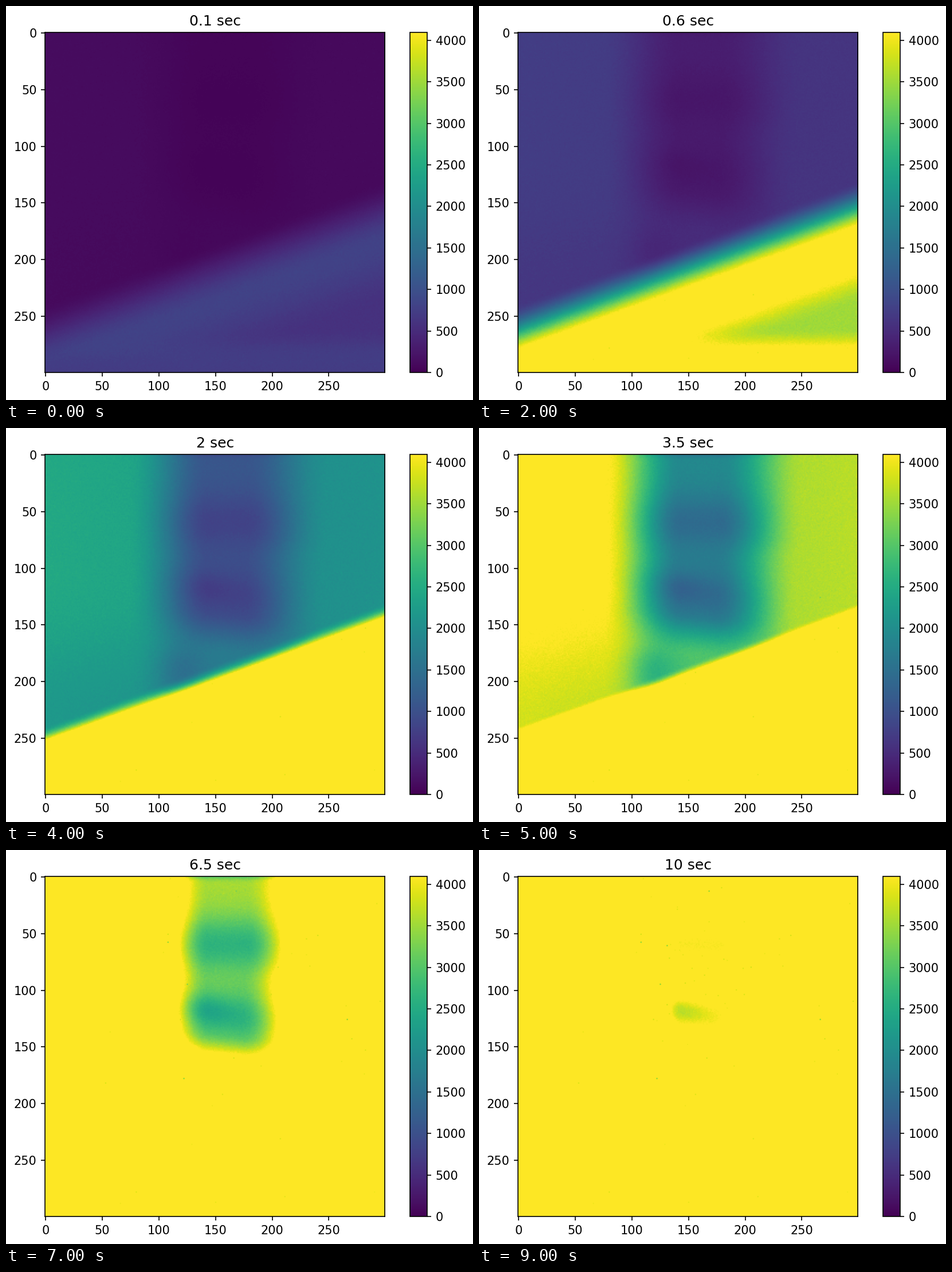
A matplotlib script that plays this animation: 815 by 687 pixels, repeating every 10 s.

```python
import numpy as np
import matplotlib.pyplot as plt
from matplotlib.animation import FuncAnimation

W, H, DPI = 815, 687, 150
N, FULL = 300, 4095
EXPOSURES = [0.1, 0.3, 0.6, 1, 2, 3.5, 5, 6.5, 8, 10]

plt.rcParams["font.family"] = "DejaVu Sans"


def step(a, b, v):
    u = np.clip((v - a) / (b - a), 0, 1)
    return u * u * (3 - 2 * u)


def bell(v, mid, width):
    return np.exp(-0.5 * ((v - mid) / width) ** 2)


def background(x, y):
    """Count rate of the dim backdrop with its dark vertical column."""
    t = y - 0.11 * (x - 150) * step(75, 110, y)
    core = 548 - 140 * bell(t, 60, 18) - 138 * bell(t, 122, 18)
    core += 300 * step(138, 178, t) - 90 * bell(t, -1, 2.5)
    core -= 45 * bell(x, 142, 17) * bell(t, 118, 8)
    left = 1235 - 0.45 * x - 140 * step(110, 235, y)
    right = 1032 + 0.4 * (x - 260)
    rate = core + (left - core) * (1 - step(72, 144, x))
    rate += (right - core) * step(177, 251, x + 4 * step(70, 95, y))
    return rate - 160 * bell(x, 117, 14) * bell(y, 191, 18)


def scene():
    """Count rate per second over the whole sensor."""
    y, x = np.mgrid[0:N, 0:N].astype(float)
    d = y - (263 - 0.3633 * x)
    back = background(x, y)
    back += (1050 - back) * step(-18, 0, d)
    glow = 7000 * step(-24, 29, d)
    wedge = 2200 * step(30, 84, d) * (1 - step(260, 294, y))
    foot = 800 * step(276, 297, y)
    return back + glow - wedge - foot


def pixel_caps():
    """Weak sensor pixels never reach full scale."""
    caps = np.full((N, N), float(FULL))
    rng = np.random.default_rng(4)
    spread = rng.uniform(0, N, (25, 2))
    cluster = rng.normal((165, 75), (32, 38), (40, 2))
    for px, py in np.clip(np.vstack([spread, cluster]), 0, N - 1).astype(int):
        caps[py, px] = rng.uniform(3750, 4000)
    for px, py in [(122, 178), (266, 126), (108, 58), (131, 61), (168, 13),
                   (125, 95)]:
        caps[py, px] = 3200
    return caps


RATE = scene()
CAPS = pixel_caps()


def exposure(i):
    counts = RATE * EXPOSURES[i]
    noise = np.random.default_rng(i).normal(size=counts.shape)
    counts = counts + 0.6 * np.sqrt(counts) * noise
    return np.clip(np.minimum(counts, CAPS), 0, FULL)


def box(left, top, right, bottom):
    return [left / W, 1 - bottom / H, (right - left) / W, (bottom - top) / H]


fig = plt.figure(figsize=((W + 1e-3) / DPI, (H + 1e-3) / DPI), dpi=DPI)
ax = fig.add_axes(box(68.2, 46, 661.2, 639))
cax = fig.add_axes(box(705.3, 46, 735, 639))
image = ax.imshow(exposure(0), cmap="viridis", vmin=0, vmax=FULL, aspect="auto")
ax.set_xticks(range(0, N, 50))
ax.set_yticks(range(0, N, 50))
fig.colorbar(image, cax=cax, ticks=range(0, 4001, 500))
title = ax.set_title("")


def update(i):
    image.set_data(exposure(i))
    title.set_text(f"{EXPOSURES[i]:g} sec")
    return image, title


anim = FuncAnimation(fig, update, frames=len(EXPOSURES), interval=1000,
                     repeat=True, repeat_delay=0, blit=False)
plt.show()
```
